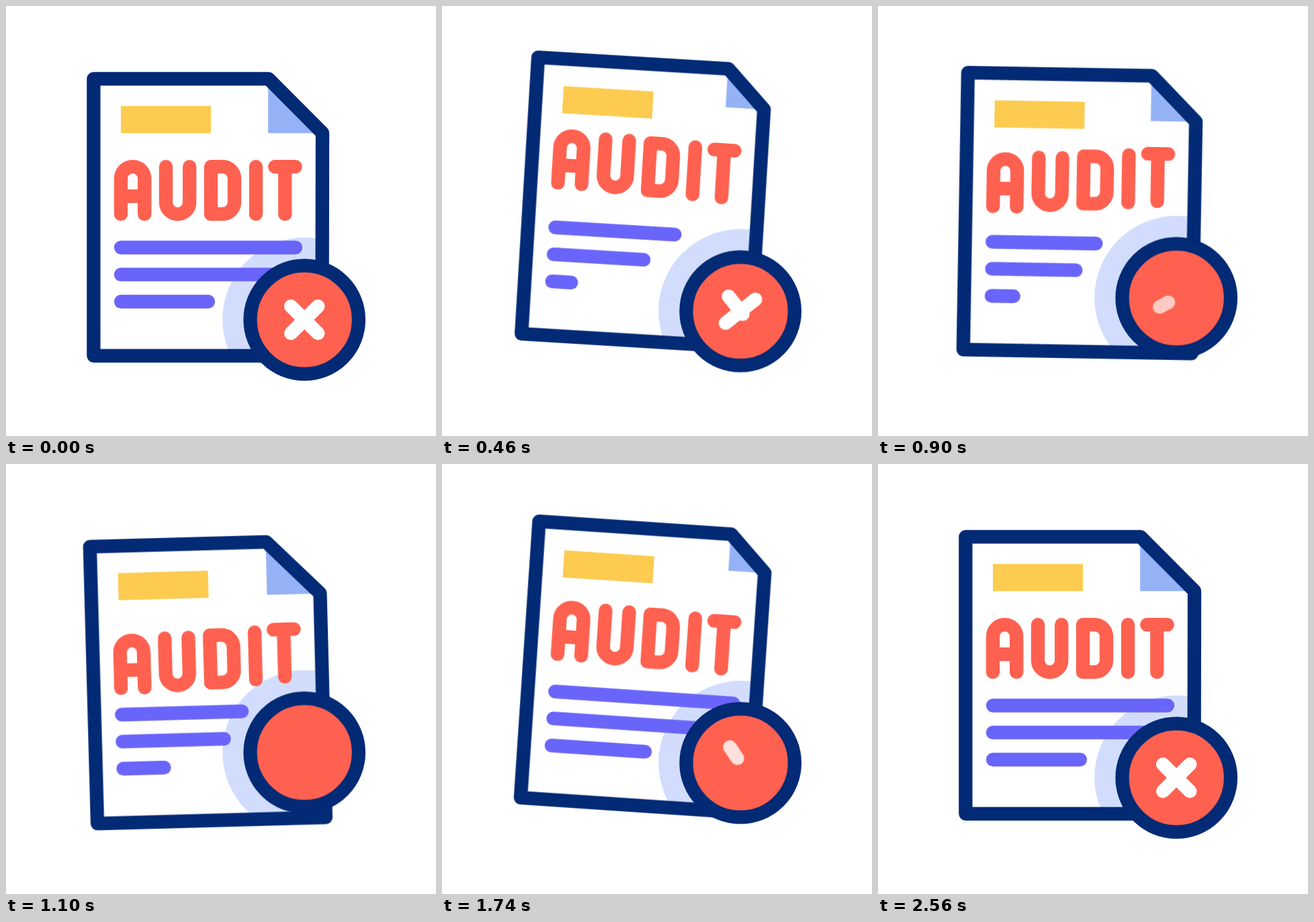
An HTML page that plays this animation: 640x640 px, repeating every 2.62 s.

```html
<!DOCTYPE html>
<html lang="en">
<head>
<meta charset="utf-8">
<title>Audit rejected</title>
<style>
  html, body { margin: 0; width: 100%; height: 100%; overflow: hidden; background: #fff; }
  svg { display: block; width: 100vw; height: 100vh; }

  :root { --navy: #032a75; --coral: #ff6150; --ease: cubic-bezier(.3333, 0, .6667, 1); }

  .page, .edge, .fold, .badge, .cross, .letters path, .lines path, .bar {
    animation: 2620ms var(--ease) var(--delay, 0ms) infinite;
  }
  .page { transform-origin: 300.4px 314.4px; animation-name: sway; }
  .edge { animation-name: edge; }
  .fold { fill: #94b2f5; animation-name: fold; }
  .badge { animation-name: float; }
  .cross { transform-origin: 444.2px 467px; animation-name: turn; }
  .letters path { animation-name: hop; }
  .lines path {
    stroke-dasharray: 400px 400px;
    stroke-dashoffset: calc(400px - var(--len));
    animation-name: stretch;
  }
  .bar { stroke-dasharray: 1 2; animation-name: trim, fade; }

  .stroke { fill: none; stroke-width: 20.3; stroke-linecap: round; stroke-linejoin: round; }
  .navy { stroke: var(--navy); }
  .letters { stroke: var(--coral); }
  .lines { stroke: #6a65fa; }
  .cross { stroke: #fff; }

  /* Beats fall every 600 ms: 22.9, 45.8, 68.7 and 91.6 percent, then a rest. */
  @keyframes sway {
    0%, 91.603%, 100% { transform: translateY(0) rotate(0deg); }
    22.901% { transform: translateY(-25.6px) rotate(4deg); }
    45.802% { transform: translateY(12.8px) rotate(-2deg); }
    68.702% { transform: translateY(-12.8px) rotate(4deg); }
  }
  @keyframes edge {
    0%, 45.802%, 91.603%, 100% { d: path("M130.4 108.4L390.8 108.4L471 189L470.4 520.6L130.4 520.6Z"); }
    22.901%, 68.702% { d: path("M130.4 108.4L417.8 108.4L470.5 161.6L470.4 520.6L130.4 520.6Z"); }
  }
  @keyframes fold {
    0%, 45.802%, 91.603%, 100% { d: path("M390.1 108.4L390.1 189.2L471 189.2Z"); }
    22.901%, 68.702% { d: path("M417.1 108.4L417.1 162L470.5 162Z"); }
  }
  @keyframes float {
    0%, 91.603%, 100% { transform: translateY(0); }
    45.802% { transform: translateY(-38.4px); }
  }
  @keyframes turn {
    0%, 91.603%, 100% { transform: rotate(0deg); }
    45.802% { transform: rotate(20deg); }
  }
  @keyframes hop {
    0%, 91.603%, 100% { transform: translateY(0); }
    22.901% { transform: translateY(-19.2px); }
    45.802% { transform: translateY(12.8px); }
    68.702% { transform: translateY(-6.4px); }
  }
  @keyframes stretch {
    0%, 91.603%, 100% { stroke-dashoffset: calc(400px - var(--len)); }
    22.901% { stroke-dashoffset: calc(517.2px - var(--len)); }
    68.702% { stroke-dashoffset: calc(389.5px - var(--len)); }
  }
  @keyframes trim {
    0%, 7.634%, 80.153%, 100% { stroke-dashoffset: 0; }
    30.534%, 57.252% { stroke-dashoffset: 1; }
  }
  @keyframes fade {
    0%, 19.084%, 68.702%, 100% { opacity: 1; animation-timing-function: linear; }
    30.534%, 57.252% { opacity: 0; animation-timing-function: linear; }
  }
</style>
</head>
<body>
<svg viewBox="0 0 640 640" xmlns="http://www.w3.org/2000/svg" role="img" aria-label="Audit">
  <clipPath id="sheet">
    <rect class="page" x="130.4" y="108.4" width="340" height="412.2"/>
  </clipPath>

  <g clip-path="url(#sheet)">
    <circle class="badge" cx="444.2" cy="466.6" r="122" fill="#d2ddfd"/>
  </g>

  <g class="page">
    <path class="fold" d="M390.1 108.4L390.1 189.2L471 189.2Z"/>
    <rect x="171" y="148.8" width="134" height="40.4" fill="#fdcb50"/>
    <g class="stroke letters">
      <path d="M171 309.7V256.7a17.6 17.6 0 0 1 35.2 0V309.7M171 283.2H206.2"/>
      <path style="--delay:40ms" d="M238 239.2V292.2a17.6 17.6 0 0 0 35.2 0V239.2"/>
      <path style="--delay:80ms" d="M305 239.2H322.4a17.6 17.6 0 0 1 17.6 17.6V292.1a17.6 17.6 0 0 1 -17.6 17.6H305Z"/>
      <path style="--delay:120ms" d="M372 239.2V309.7"/>
      <path style="--delay:160ms" d="M400.2 239.2H430.7M415.3 239.2V309.7"/>
    </g>
    <g class="stroke lines">
      <path style="--len:260px;--delay:80ms" d="M171 359.5h300"/>
      <path style="--len:226.5px;--delay:40ms" d="M171 399.7h300"/>
      <path style="--len:130px" d="M171 440h300"/>
    </g>
    <path class="stroke navy edge" d="M130.4 108.4L390.8 108.4L471 189L470.4 520.6L130.4 520.6Z"/>
  </g>

  <g class="badge">
    <circle class="navy" cx="444.2" cy="467" r="80.7" fill="#ff6150" stroke-width="20.3"/>
    <g class="stroke cross">
      <path class="bar" style="--delay:300ms" pathLength="1" d="M424.1 487.1L464.3 446.9"/>
      <path class="bar" pathLength="1" d="M424.1 446.9L464.3 487.1"/>
    </g>
  </g>
</svg>
</body>
</html>
```
